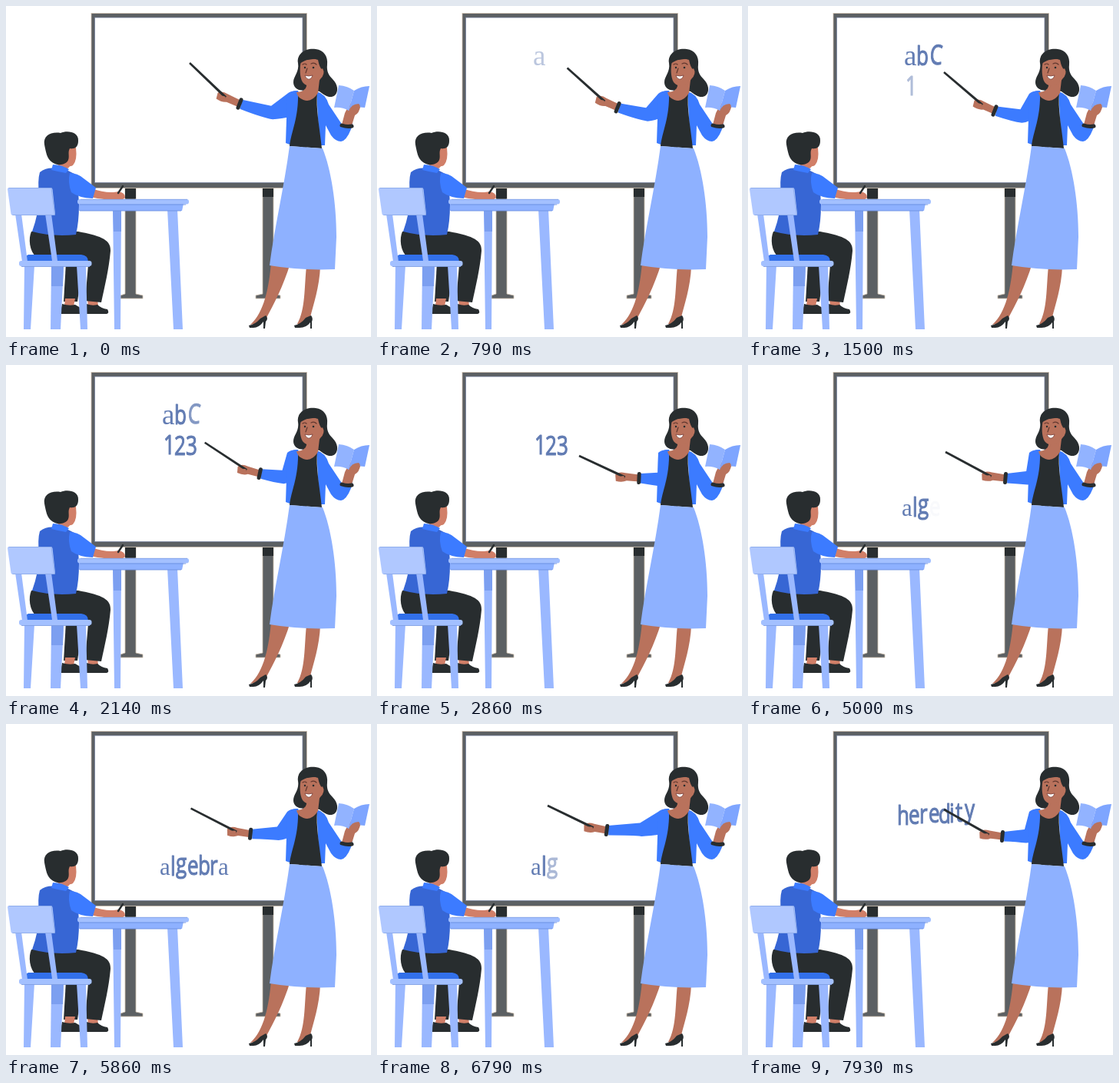
Write an HTML page that moves like this. It is 475 by 430 pixels and loops after 8 s.

```html
<!DOCTYPE html>
<html lang="en">
<head>
<meta charset="utf-8">
<title>Lesson</title>
<style>
html, body { margin: 0; width: 100%; height: 100%; overflow: hidden; background: #fff; }
svg { display: block; width: 100vw; height: 100vh; }
text { font-family: "Open Sans", "Noto Sans", sans-serif; font-size: 26px; fill: #627cb3; stroke: #627cb3; stroke-width: .9; stroke-linejoin: round; }
text.serif { font-family: "Liberation Serif", "Noto Serif", serif; stroke: none; }
.dark { fill: #282d2f; }
.metal { fill: #5c6063; }
.pale { fill: #8eb1ff; }
.wood { fill: #9ab8ff; }
.shade { fill: #7c9ff0; }
.ice { fill: #b0c8ff; }
.blue { fill: #3c7bff; }
.navy { fill: #3766d4; }
.tan { fill: #d17f68; }
.brown { fill: #b9725c; }
.line { fill: none; stroke-linecap: round; stroke-linejoin: round; }
</style>
</head>
<body>
<svg viewBox="0 0 475 430" xmlns="http://www.w3.org/2000/svg">
  <g id="board">
    <g stroke="#cdbfae" stroke-width=".8">
      <path class="metal" d="M155 236h14v138l9 2v4h-29v-4l6-2zM334 236h14v138l9 2v4h-32v-4l9-2z"/>
      <rect class="metal" x="111" y="9.500" width="280.5" height="227"/>
    </g>
    <path class="dark" d="M155 237h14v13h-14zM334 237h14v11h-14z"/>
    <rect x="115.500" y="15" width="270.500" height="214.500" fill="#fff" stroke="#75809c" stroke-width=".8"/>
  </g>
  <g id="words"></g>

  <g id="pupil">
    <path class="dark" d="M78 334L100 334L93 384H75z"/>
    <path class="tan" d="M77 380h13l-2 10H76zM106 381h13l1 9h-13z"/>
    <path class="dark" d="M73 387Q82 390 90 388Q97 393 105 395Q107 400 103 400H72Q71 393 73 387zM105 387Q112 390 119 388Q124 393 132 394Q135 399 131 400H105z"/>
    <path class="dark" d="M33 293H94C119 298 137 302 136 318C134 342 128 366 124 385L103 383L107 336C88 330 60 333 40 327C30 318 29 302 33 293z"/>
    <path class="navy" d="M44 216Q53 209 66 211Q84 212 93 222L95 258Q95 280 91 297Q60 300 34 293Q43 268 43 246Q41 226 44 216z"/>
    <path class="tan" d="M67 193L83 192L84 207Q79 215 68 212z"/>
    <path class="tan" d="M78 180L91 184Q93 201 87 207Q82 210 76 206z"/>
    <path class="dark" d="M50 180C48 169 58 163 71 165C79 161 95 163 94 175C94 184 89 186 83 185C80 190 83 195 81 200C78 207 66 208 60 203C53 198 52 190 50 180z"/>
    <path class="tan" d="M82 190Q87 183 90 190Q88 198 82 198z"/>
    <path class="blue" d="M61 206Q72 206 82 212L78 217Q67 215 59 213z"/>
    <path class="tan" d="M112 237C124 242 138 243 146 241Q155 242 155 249L151 252C137 252 121 251 110 248z"/>
    <path class="blue" d="M83 217Q93 217 101 224L117 236L113 250Q94 249 85 242Q80 229 83 217z"/>
    <path class="line" d="M146 243L152 234" stroke="#282d2f" stroke-width="2.4"/>
  </g>

  <g id="table">
    <path class="wood" d="M139 264h11l-1 156h-8zM210 264h13l7 156h-12z"/>
    <path class="shade" d="M139 264h11v29h-10z"/>
    <path class="pale" d="M95 257H231L229 266H95z"/>
    <rect x="93" y="251" width="145" height="6.5" rx="3" fill="#a3c0ff"/>
    <path d="M96 258H234M96 266H228" stroke="#6c90e0" stroke-width=".9"/>
    <path d="M97 251.3H236" stroke="#7f9fe4" stroke-width=".8"/>
  </g>

  <g id="chair">
    <path class="wood" d="M59 337h16l-4 83H58z"/>
    <path class="shade" d="M59 337h16l-1 27H59z"/>
    <path class="wood" d="M24 337h13l-5 83h-9zM92 337h12l2 83h-9z"/>
    <path d="M29 323H98Q107 324 107 332H25Q24 325 29 323z" fill="#3270ea"/>
    <path class="wood" d="M12 270h8l8 62h-7zM51 270h8l8 61h-7z"/>
    <rect x="17" y="331" width="94.500" height="7" rx="3" fill="#a3c0ff"/>
    <path d="M20 338.500H109" stroke="#7f9fe4" stroke-width=".9"/>
    <path class="ice" d="M4 236H58Q60 236 60.500 238L64 270Q64 272 62 272H9Q7 272 6.500 270L2 238Q2 236 4 236z"/>
    <path class="line" d="M4 236.500H59L63.500 271.500H9" stroke="#88a7e8" stroke-width=".8"/>
  </g>

  <g id="teacher">
    <path class="brown" d="M345 334H370C361 364 348 388 339 405L324 413L318 414C336 398 342 366 345 334zM391 338H409C408 365 400 388 396 404L383 414L379 413C390 394 388 365 391 338z"/>
    <path class="dark" d="M316 415Q324 414 331 406L338 402Q342 406 338 410L337 419H335V410Q329 418 322 418H317zM375 415Q384 413 390 405L397 402Q400 406 398 410V419H396V411Q391 418 382 418H376z"/>
    <path class="dark" d="M380 74C378 62 390 54 403 56C414 57 419 66 418 76C417 85 420 90 425 95C432 102 433 111 428 116C422 121 414 116 408 111L392 108C382 112 374 107 374 99C374 91 382 86 380 74z"/>
    <path class="blue" d="M404 111Q416 114 420 128L438 155L451 151L449 160Q443 175 436 176Q429 176 423 168L416 155L415 181H408z"/>
    <path class="blue" id="sleeve"/>
    <path class="blue" d="M380 110Q368 110 366 117L364 178L372 181L386 125z"/>
    <path class="dark" d="M380 112H405C403 134 408 156 411 185L369 182C371 163 381 146 380 112z"/>
    <path class="brown" d="M392 96H408L406 113Q398 126 387 122Q379 119 378 112Q390 111 391 104z"/>
    <path class="brown" d="M384 71C382 81 382 92 386 99C392 107 403 104 409 95Q416 88 412 81L407 68z"/>
    <path class="dark" d="M381 76C383 64 393 60 402 62C416 62 418 76 411 82Q408 80 406 70Q394 66 381 76z"/>
    <path class="line" d="M386 76Q389 74 391 76M397 75Q401 73 404 76M392 81L390 87" stroke="#62382f" stroke-width="1.200"/>
    <circle class="dark" cx="389" cy="80" r="1.200"/><circle class="dark" cx="400" cy="80" r="1.300"/>
    <path d="M389 90Q394 92 399 90Q397 96 393 95Q390 94 389 90z" fill="#fff" stroke="#6d302b" stroke-width=".7"/>
    <path class="pale" d="M369 182L412 185C423 212 430 256 430 300L428 342Q384 344 343 337C349 290 362 235 369 182z"/>
    <path class="brown" d="M437 154L441 139L447 127Q455 124 461 130Q460 139 454 142L450 155z"/>
    <path d="M433 103Q445 104 453 110L446 136Q437 131 427 132z" fill="#92b3ff"/>
    <path d="M453 110Q462 104 473 104L467 132Q455 130 446 136z" fill="#7ea5ff"/>
    <path class="brown" d="M446 137Q449 127 459 127Q464 131 456 139L450 146z"/>
    <path class="line" d="M437 155Q444 157.500 450 156" stroke="#282d2f" stroke-width="5"/>
    <path class="brown" id="forearm"/>
    <path class="line" id="cuff" stroke="#282d2f" stroke-width="5"/>
    <path class="dark" id="stick"/>
    <path class="line" id="finger" stroke="#b9725c" stroke-width="4"/>
  </g>
</svg>
<script>
const LOOP = 8000, FPS = 14, TALL = 1.35;
const $ = id => document.getElementById(id);
const clamp = v => Math.min(1, Math.max(0, v));

// time, wrist x y, hand x y, pointer tip x y
const poses = [
  [0, 304, 127, 281, 118, 239, 74],
  [1500, 321, 136, 300, 128, 255, 86],
  [2857, 341, 147, 317, 146, 263, 118],
  [3857, 309, 122, 290, 111, 251, 62],
  [5000, 335, 147, 311, 145, 257, 113],
  [6786, 299, 138, 276, 135, 222, 106],
  [7929, 331, 146, 308, 144, 255, 111]
];

// glyphs: character, x, baseline, optional serif size, optional tilt
const words = [
  { from: 700, to: 2100, step: 200, glyphs: [["a", 203, 77, 37], ["b", 219, 77], ["C", 236, 75, 0, 4]] },
  { from: 1420, to: 3460, step: 160, glyphs: [["1", 205, 116], ["2", 219, 117], ["3", 234, 117]] },
  { from: 4575, to: 6160, step: 140, glyphs: [["a", 200, 196, 31], ["l", 214, 197], ["g", 221, 193],
    ["e", 236, 196], ["b", 250, 196], ["r", 265, 196], ["a", 276, 196, 31]] },
  { from: 7050, to: 9000, step: 100, glyphs: [["h", 194, 131], ["e", 209, 130], ["r", 223, 129], ["e", 235, 128],
    ["d", 248, 129], ["i", 262, 128], ["t", 270, 127], ["y", 282, 123]] }
];

for (const word of words) {
  word.nodes = word.glyphs.map(([ch, x, y, serif, tilt = 0]) => {
    const el = document.createElementNS("http://www.w3.org/2000/svg", "text");
    el.textContent = ch;
    el.setAttribute("transform", `translate(${x} ${y}) rotate(${tilt}) scale(1 ${serif ? 1 : TALL})`);
    if (serif) {
      el.setAttribute("class", "serif");
      el.style.fontSize = serif + "px";
    }
    $("words").append(el);
    return el;
  });
}

function poseAt(t) {
  let i = 0;
  while (i < poses.length - 2 && t >= poses[i + 1][0]) i++;
  const a = poses[i], b = poses[i + 1];
  const k = clamp((t - a[0]) / (b[0] - a[0]));
  const e = k * k * (3 - 2 * k);
  return a.slice(1).map((v, n) => v + (b[n + 1] - v) * e);
}

// Places points given as (along, across) on the line from a to b
function frame(ax, ay, bx, by) {
  const len = Math.hypot(bx - ax, by - ay) || 1;
  const ux = (bx - ax) / len, uy = (by - ay) / len;
  return (along, across) =>
    `${(ax + ux * along - uy * across).toFixed(2)} ${(ay + uy * along + ux * across).toFixed(2)}`;
}

function drawArm(t) {
  const [wx, wy, hx, hy, tx, ty] = poseAt(t);
  const bend = 342 - wx;
  const ex = 368 - bend * .55, ey = 148 - bend * .27;
  const low = frame(wx, wy, ex, ey);
  const hand = frame(wx, wy, hx, hy);
  const rod = frame(hx + 2, hy - 2, tx, ty);
  const rodLen = Math.hypot(tx - hx - 2, ty - hy + 2);
  const reach = Math.hypot(hx - wx, hy - wy);

  $("sleeve").setAttribute("d",
    `M380 110Q370 110 366 114L${ex - 2} ${ey - 8}L${low(2, -6)}L${low(2, 6.5)}` +
    `Q${ex - 12} ${ey + 8} ${ex} ${ey + 9.5}Q${ex + 10} ${ey + 9} 374 143z`);
  $("forearm").setAttribute("d",
    `M${hand(0, 4.5)}L${hand(reach - 6, 6)}Q${hand(reach + 3, 8)} ${hand(reach + 7, 3)}` +
    `L${hand(reach + 6, -5)}Q${hand(reach - 2, -7)} ${hand(reach - 8, -4)}L${hand(0, -4.5)}z`);
  $("cuff").setAttribute("d", `M${hand(0, -5.5)}L${hand(0, 5.5)}`);
  $("stick").setAttribute("d",
    `M${rod(-4, -1.6)}L${rod(rodLen, -1.3)}L${rod(rodLen, 1.3)}L${rod(-4, 1.6)}z`);
  $("finger").setAttribute("d", `M${hand(reach - 3, 0)}L${hand(reach + 3, -1)}`);
}

function drawWords(t) {
  for (const { from, to, step, nodes } of words) {
    nodes.forEach((el, i) => {
      const shown = clamp((t - from - i * step) / step);
      const gone = clamp((t - to - (nodes.length - 1 - i) * step) / step);
      el.style.opacity = shown * (1 - gone);
    });
  }
}

function render(ms) {
  const t = Math.floor((ms % LOOP) * FPS / 1000 + .05) * 1000 / FPS;
  drawArm(t);
  drawWords(t);
}

const start = performance.now();
function tick() {
  render(performance.now() - start);
  requestAnimationFrame(tick);
}
tick();
</script>
</body>
</html>
```
